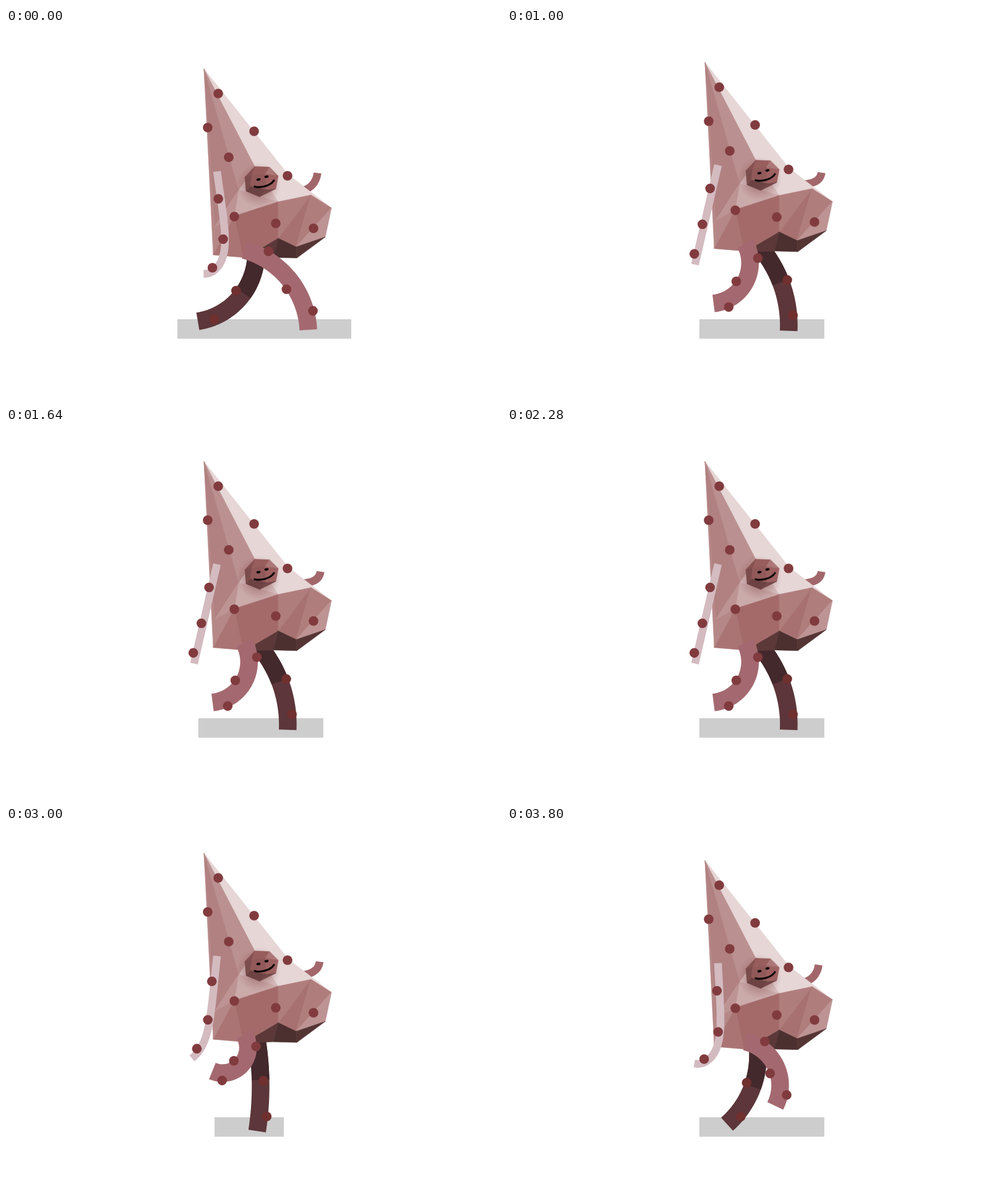
Animation of 800 by 600 pixels, one loop 3840 ms. Source, as an HTML page with a canvas:

```html
<!DOCTYPE html>
<html lang="en">
<head>
<meta charset="utf-8">
<title>Walking cone</title>
<style>
  html, body { margin: 0; width: 100%; height: 100%; overflow: hidden; background: #fff; }
  canvas { display: block; }
</style>
</head>
<body>
<canvas id="stage" width="800" height="600"></canvas>
<script>
const ctx = document.getElementById('stage').getContext('2d');
const STEP = 40, CYCLE = 16, DOT = '#813b3e', INK = '#0c0606';

// Mesh corners, with the body at its lowest point.
const corners = {
  a: [320, 66], b: [456, 237], c: [526, 291], d: [493, 270], e: [440, 281], f: [402, 224],
  g: [376, 262], h: [337, 322], i: [369, 304], j: [335, 367], k: [383, 371], l: [440, 340],
  m: [403, 362], n: [404, 372], o: [469, 354], p: [516, 338], q: [470, 372], r: [432, 371],
  A: [402, 224], B: [426, 225], C: [440, 239], D: [436, 260], E: [410, 273], F: [388, 264],
  G: [386, 241], H: [397, 238], I: [419, 236], J: [421, 262], K: [395, 256]
};
// Facets: corner letters and lightness.
const body = {
  abcdef: 87, feg: 79, gei: 73, afg: 65, agh: 60, ahj: 62, gih: 66, hij: 62, jik: 56,
  ielmnk: 53, edl: 59, dol: 55, dco: 59, cpo: 66, mlrn: 29, loqr: 24, opq: 27
};
const face = { ABIH: 48, BCI: 57, GAH: 42, GHKF: 39, HIJK: 46, ICDJ: 50, FKJE: 34, JDE: 37 };
const bodyDots = [[343, 106], [326, 161], [401, 167], [360, 209], [455, 239], [369, 305], [436, 316], [497, 324]];

// Limb poses by step of the walk: heading at the joint, bend (degrees), length.
const leg = {
  0: [74, -72, 177], 1: [42, -45, 154], 3: [10, -19, 157], 7: [8, -57, 148],
  8: [2, -84, 163], 9: [27, -112, 129], 11: [30, -145, 104], 15: [76, -104, 132]
};
const arm = { 0: [8, -108, 184], 3: [8, -35, 174], 9: [-13, 0, 165], 15: [3, -115, 186] };

// Each quarter of the walk eases out of a contact and into the next one.
function warp(p) {
  const k = (p % 8 - 4) / 4;
  return 2 * Math.floor(p / 8) + 1 + Math.sign(k) * k * k;
}

function pose(keys, p) {
  p %= CYCLE;
  const steps = Object.keys(keys).map(Number);
  const i = steps.findLastIndex(s => s <= p);
  const from = steps[i], to = steps[i + 1] ?? CYCLE;
  const k = (warp(p) - warp(from)) / (warp(to) - warp(from));
  return keys[from].map((v, n) => v + (keys[to % CYCLE][n] - v) * k);
}

// Walks along a limb whose heading turns by bend * t^curl.
function limb(x, y, [start, bend, length], curl = 1, count = 50) {
  const points = [];
  for (let i = 0; i <= count; i++) {
    const angle = (start + bend * (i / count) ** curl) * Math.PI / 180;
    const dx = Math.sin(angle), dy = Math.cos(angle);
    points.push({ x, y, dx, dy });
    x += dx * length / count;
    y += dy * length / count;
  }
  return points;
}

function drawLimb(points, width, color, dash = []) {
  ctx.beginPath();
  for (const { x, y } of points) ctx.lineTo(x, y);
  ctx.lineWidth = width;
  ctx.strokeStyle = color;
  ctx.setLineDash(dash);
  ctx.stroke();
  ctx.setLineDash([]);
}

function drawDot(x, y, color = DOT) {
  ctx.fillStyle = color;
  ctx.beginPath();
  ctx.arc(x, y, 7.8, 0, 7);
  ctx.fill();
}

// A dot at part t of the limb, moved sideways.
function dotOn(points, t, side, color) {
  const { x, y, dx, dy } = points[Math.round(t * (points.length - 1))];
  drawDot(x + dy * side, y - dx * side, color);
}

function drawFacets(facets) {
  ctx.lineWidth = .6;
  for (const [letters, light] of Object.entries(facets)) {
    ctx.fillStyle = ctx.strokeStyle = `hsl(0 24% ${light}%)`;
    ctx.beginPath();
    for (const letter of letters) ctx.lineTo(...corners[letter]);
    ctx.closePath();
    ctx.fill();
    ctx.stroke();
  }
}

function drawFace() {
  const shade = ctx.createRadialGradient(408, 254, 18, 408, 254, 36);
  shade.addColorStop(0, 'rgba(130,70,70,.35)');
  shade.addColorStop(1, 'rgba(150,90,90,0)');
  ctx.fillStyle = shade;
  ctx.fillRect(372, 218, 72, 72);
  drawFacets(face);
  ctx.fillStyle = ctx.strokeStyle = INK;
  for (const [x, y] of [[408, 245], [421, 240.5]]) {
    ctx.beginPath();
    ctx.ellipse(x, y, 3.4, 2, -.2, 0, 7);
    ctx.fill();
  }
  ctx.lineWidth = 3.2;
  ctx.lineCap = 'round';
  ctx.beginPath();
  ctx.moveTo(402, 256.5);
  ctx.bezierCurveTo(410, 259, 427, 256, 433, 246.5);
  ctx.stroke();
  ctx.lineCap = 'butt';
}

function draw(p) {
  const half = p % 8, k = Math.abs(1 - half / 4);
  const lift = -23.4 * (1 - k * k);
  const turn = p / CYCLE * 2 * Math.PI, sway = Math.cos(turn);
  ctx.fillStyle = '#fff';
  ctx.fillRect(0, 0, 800, 600);

  const left = 277 + 61.3 * (1 - k ** 2.8);
  const right = 558 - 118 * Math.sin(Math.PI * half / 8);
  ctx.fillStyle = '#cdcdcd';
  ctx.fillRect(left, 471, right - left, 31.5);

  ctx.save();
  ctx.translate(0, lift);

  const farLeg = limb(404, 359, pose(leg, p + 8));
  drawLimb(farLeg, 28.5, '#5c363a');
  drawLimb(farLeg, 28.5, '#43292c', [74, 999]);
  dotOn(farLeg, .48, -12 * sway, '#70302f');
  dotOn(farLeg, .84, 4 - 9 * Math.sin(turn), '#70302f');

  const handX = 506 - 2.5 * sway, handY = 239.5 - 5 * sway;
  ctx.beginPath();
  ctx.moveTo(474, 264);
  ctx.bezierCurveTo(491, 262, handX - 2, handY + 16, handX, handY);
  ctx.lineWidth = 12.5;
  ctx.strokeStyle = '#a2676b';
  ctx.stroke();

  drawFacets(body);
  drawFace();
  for (const [x, y] of bodyDots) drawDot(x, y);

  const nearLeg = limb(385, 359, pose(leg, p));
  drawLimb(nearLeg, 28.5, '#a46970');
  dotOn(nearLeg, .2, 13);
  dotOn(nearLeg, .56, -13);
  dotOn(nearLeg, .84, 12);

  const nearArm = limb(341, 232, pose(arm, p), 5);
  drawLimb(nearArm, 12.5, '#d3bbc0');
  dotOn(nearArm, .23, -4);
  dotOn(nearArm, .6, -3);
  dotOn(nearArm, .89, -5);
  ctx.restore();
}

function tick(now) {
  draw(Math.floor(now / STEP) % CYCLE);
  requestAnimationFrame(tick);
}
draw(0);
requestAnimationFrame(tick);
</script>
</body>
</html>
```
